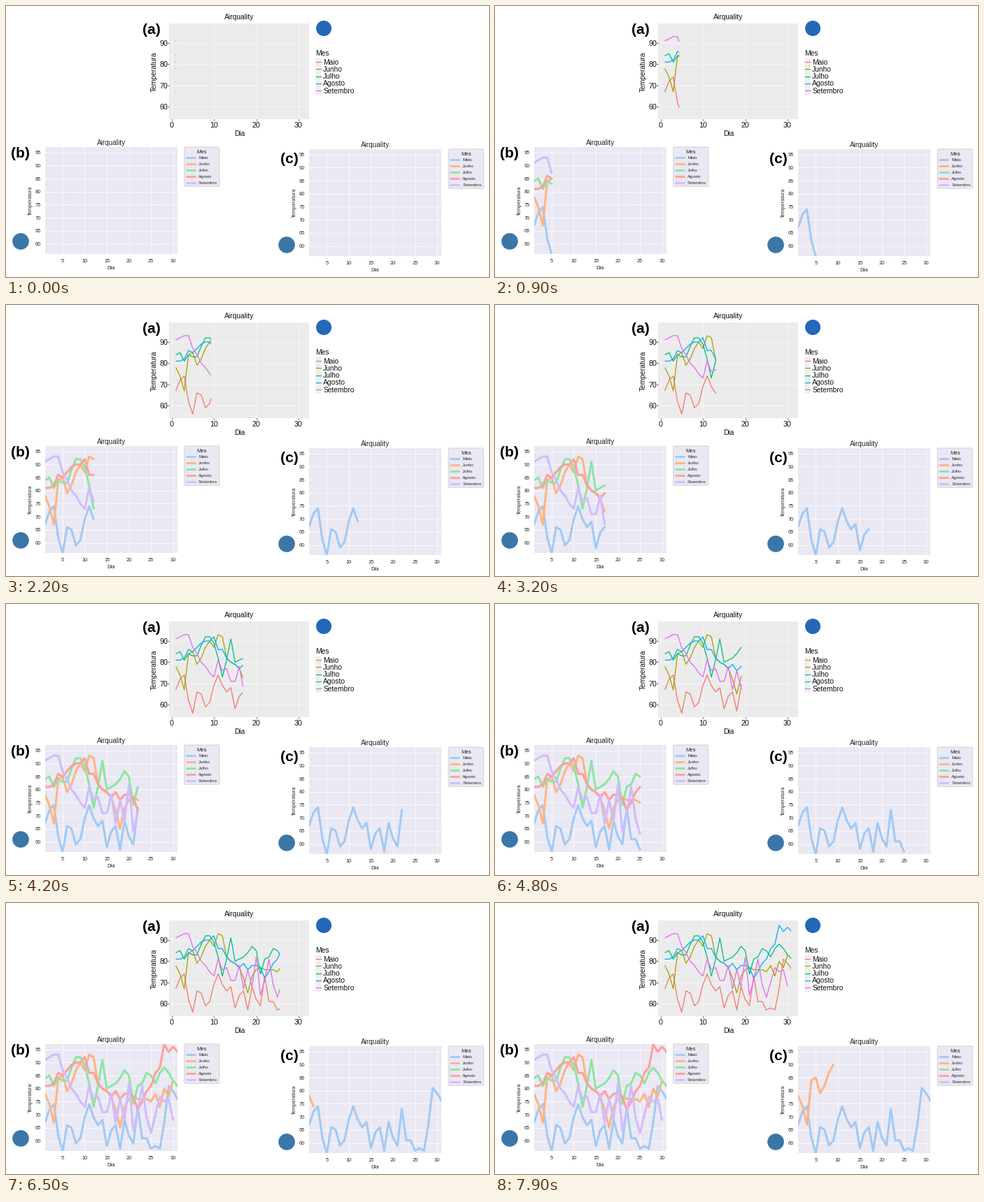
A matplotlib script for the animation above (8000 ms loop, 690 px wide and 388 px high).

```python
import numpy as np
import matplotlib.pyplot as plt
from matplotlib.animation import FuncAnimation
from matplotlib.patches import Circle, FancyBboxPatch, Rectangle

W, H, DPI = 690, 388, 100
PT = 72 / DPI  # points per pixel
FRAMES, STEP_MS = 80, 100
plt.rcParams["font.family"] = "Liberation Sans"

# Daily temperatures of the airquality data set
may = [67, 72, 74, 62, 56, 66, 65, 59, 61, 69, 74, 69, 66, 68, 58, 64,
       66, 57, 68, 62, 59, 73, 61, 61, 57, 58, 57, 67, 81, 79, 76]
june = [78, 74, 67, 84, 85, 79, 82, 87, 90, 87, 93, 92, 82, 80, 79, 77,
        72, 65, 73, 76, 77, 76, 76, 76, 75, 78, 73, 80, 77, 83]
july = [84, 85, 81, 84, 83, 83, 88, 92, 92, 89, 82, 73, 81, 91, 80, 81,
        82, 84, 87, 85, 74, 81, 82, 86, 85, 82, 86, 88, 86, 83, 81]
august = [81, 81, 82, 86, 85, 87, 89, 90, 90, 92, 86, 86, 82, 80, 79, 77,
          79, 76, 78, 78, 77, 72, 75, 79, 81, 86, 88, 97, 94, 96, 94]
september = [91, 92, 93, 93, 87, 84, 80, 78, 75, 73, 81, 76, 77, 71, 71, 78,
             67, 76, 68, 82, 64, 71, 81, 69, 63, 70, 77, 75, 76, 68]
temps = [np.array(m, float) for m in (may, june, july, august, september)]
months = ["Maio", "Junho", "Julho", "Agosto", "Setembro"]
HUES = ["#F8766D", "#A3A500", "#00BF7D", "#00B0F6", "#E76BF3"]
PASTEL = ["#A1C9F4", "#FFB482", "#8DE5A1", "#FF9F9B", "#D0BBFF"]

fig = plt.figure(figsize=(W / DPI, H / DPI), dpi=DPI, facecolor="white")
ax = fig.add_axes([0, 0, 1, 1])
ax.set(xlim=(0, W), ylim=(H, 0))
ax.axis("off")


def text(x, y, s, size, ha="center", color="#111111", **kw):
    ax.text(x, y + 0.36 * size, s, fontsize=size * PT, ha=ha, va="baseline",
            color=color, zorder=5, **kw)


def vtext(x, y, s, size, color="#111111"):
    ax.text(x, y, s, fontsize=size * PT, rotation=90, ha="center",
            va="center", color=color, zorder=5)


def seg(x, y, color, width, **kw):
    return ax.plot(x, y, color=color, lw=width * PT, **kw)[0]


def box(x0, y0, x1, y1, color):
    return ax.add_patch(Rectangle((x0, y0), x1 - x0, y1 - y0, fc=color,
                                  ec="none", zorder=1))


def curves(colors, width, panel, **kw):
    lines = [seg([], [], c, width, zorder=3, **kw) for c in colors]
    for line in lines:
        line.set_clip_path(panel)
    return lines


def gg_x(day):
    return 236.5 + 6.05 * np.asarray(day)


def gg_y(temp):
    return 53 + 3.037 * (90 - np.asarray(temp))


def gg_panel():
    left, top, right, bottom = 233, 25, 432.5, 162
    panel = box(left, top, right, bottom, "#EBEBEB")
    for i in range(7):
        c, w = ("#F7F7F7", 0.9) if i % 2 == 0 else ("#F1F1F1", 0.6)
        seg([gg_x(5 * i)] * 2, [top, bottom], c, w, zorder=2)
    for t in range(55, 100, 5):
        c, w = ("#F7F7F7", 0.9) if t % 10 == 0 else ("#F1F1F1", 0.6)
        seg([left, right], [gg_y(t)] * 2, c, w, zorder=2)
    for d in (0, 10, 20, 30):
        seg([gg_x(d)] * 2, [bottom, bottom + 2], "#555555", 0.8)
        text(gg_x(d), 170, str(d), 10.6)
    for t in (60, 70, 80, 90):
        seg([left - 2, left], [gg_y(t)] * 2, "#555555", 0.8)
        text(231.3, gg_y(t), str(t), 10.6, "right")
    text(333, 15, "Airquality", 10.3)
    text(333.5, 182, "Dia", 10.3)
    vtext(211.5, 94, "Temperatura", 10.2)

    text(442, 67.5, "Mes", 10.3, "left")
    box(442, 75, 450.3, 126.5, "#EFEFEF")
    for i, (name, c) in enumerate(zip(months, HUES)):
        y = 80.2 + 10.2 * i
        seg([442.8, 449.5], [y, y], c, 1.3)
        text(453.2, y, name, 10.2, "left")
    return curves(HUES, 1.3, panel, solid_capstyle="butt",
                  solid_joinstyle="round")


class SnsPanel:
    BG, INK = "#E9E8F3", "#262626"

    def __init__(self, dx, dy):
        self.dx, self.dy = dx, dy
        left, right = self.x(1), self.x(31)
        top, bottom = self.y(97), self.y(56)
        panel = box(left, top, right, bottom, self.BG)
        for d in range(5, 31, 5):
            seg([self.x(d)] * 2, [top, bottom], "white", 0.9, alpha=0.8, zorder=2)
            text(self.x(d), 364 + dy, str(d), 7.4, color=self.INK)
        for t in range(60, 100, 5):
            seg([left, right], [self.y(t)] * 2, "white", 0.9, alpha=0.8, zorder=2)
            text(49.7 + dx, self.y(t), str(t), 7.4, "right", self.INK)
        text(150.3 + dx, 195 + dy, "Airquality", 10, color=self.INK)
        text(150.3 + dx, 374 + dy, "Dia", 7.6, color=self.INK)
        vtext(34.8 + dx, 278.5 + dy, "Temperatura", 7.5, self.INK)
        self.legend()
        self.lines = curves(PASTEL, 3, panel, solid_capstyle="round",
                            solid_joinstyle="round")

    def x(self, day):
        return 55.7 + 6.31 * (np.asarray(day) - 1) + self.dx

    def y(self, temp):
        return 209.5 + 3.743 * (95 - np.asarray(temp)) + self.dy

    def legend(self):
        dx, dy = self.dx, self.dy
        ax.add_patch(FancyBboxPatch(
            (254.7 + dx, 201.9 + dy), 50.2, 56.4, fc=self.BG, ec="#CCCCCC",
            boxstyle="round,pad=0,rounding_size=1.5", lw=0.8 * PT, zorder=1))
        text(280 + dx, 208 + dy, "Mes", 7.6, color=self.INK)
        for i, (name, c) in enumerate(zip(months, PASTEL)):
            y = 217 + 9 * i + dy
            seg([258 + dx, 270 + dx], [y, y], c, 2.8, solid_capstyle="round")
            text(275 + dx, y, name, 6.3, "left", self.INK)

    def show(self, i, count):
        vals = temps[i][:max(count, 0)]
        self.lines[i].set_data(self.x(np.arange(1, len(vals) + 1)), self.y(vals))


def reveal(temp, day):
    """Curve up to a fractional day, with an interpolated end point."""
    end = min(day, len(temp))
    days = np.append(np.arange(1, int(end) + 1), end)
    return days, np.interp(days, np.arange(1, len(temp) + 1), temp)


gg_lines = gg_panel()
dots = [ax.add_patch(Circle((gg_x(1), gg_y(t[0])), 0.8, fc=c, ec="none",
                            alpha=0.7, zorder=3))
        for t, c in zip(temps, HUES)]
together = SnsPanel(0, 0)
in_turn = SnsPanel(377.3, 3)

for x, y, tag in ((207.5, 32, "(a)"), (20.3, 209.5, "(b)"), (404.5, 217.5, "(c)")):
    text(x, y, tag, 21, color="black", weight="bold")
for x, y, r, c in ((454, 32, 11, "#2468B8"), (21, 337, 11.8, "#3B76A8"),
                   (401, 342, 11.8, "#3B76A8")):
    ax.add_patch(Circle((x, y), r, fc=c, ec="none", zorder=4))


def draw(n):
    day = 1 + 0.3775 * n
    count = 1 + n // 2
    first = 0
    for i, temp in enumerate(temps):
        days, vals = reveal(temp, day)
        gg_lines[i].set_data(gg_x(days), gg_y(vals))
        dots[i].set_visible(n == 0)
        together.show(i, count)
        in_turn.show(i, count - first)
        first += len(temp)
    return gg_lines + dots + together.lines + in_turn.lines


anim = FuncAnimation(fig, draw, frames=FRAMES, interval=STEP_MS,
                     repeat=True, repeat_delay=0, blit=False)
plt.show()
```
